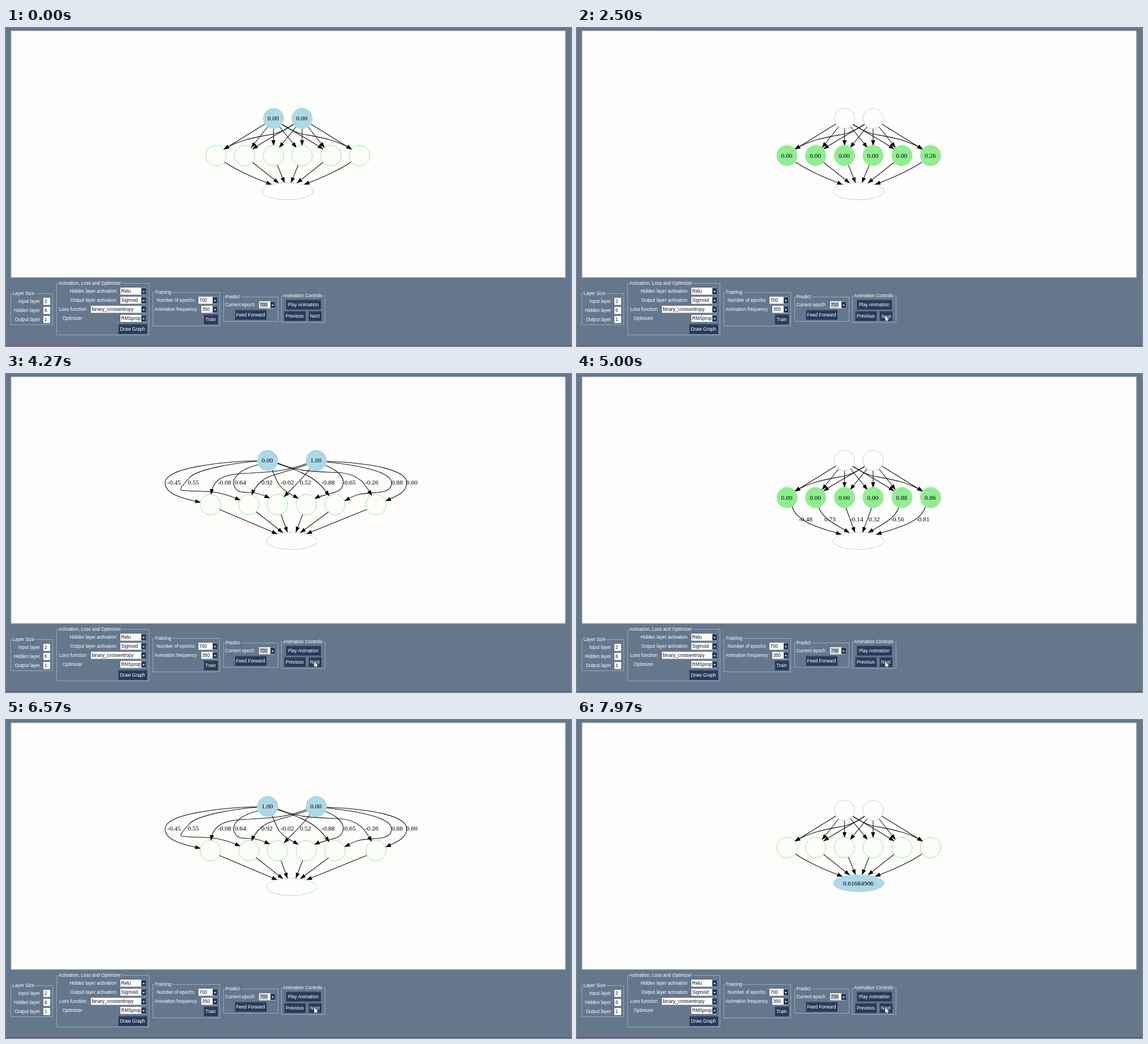
Recreate the animation shown at these times as an HTML page. Size 998 by 561 pixels, loop 8 s.

```html
<!DOCTYPE html>
<html lang="en">
<head>
<meta charset="utf-8">
<title>Neural network feed forward</title>
<style>
  html, body { margin: 0; width: 100%; height: 100%; overflow: hidden; background: #64778d; }
  svg { display: block; }
  .ui { font: 8.2px "Liberation Sans", Arial, sans-serif; fill: #fff; }
  .ui .field { fill: #111; }
  .legend { stroke: #64778d; stroke-width: 4px; paint-order: stroke; }
  .graph { font: 11.4px "Liberation Serif", "Times New Roman", serif; }
  .edge { fill: none; stroke: #111; stroke-width: 1.1px; marker-end: url(#arrow); }
</style>
</head>
<body>
<svg width="998" height="561" viewBox="0 0 998 561">
  <defs>
    <marker id="arrow" markerUnits="userSpaceOnUse" markerWidth="10" markerHeight="8" refX="9.5" refY="4" orient="auto">
      <path d="M0 .4L10 4L0 7.6z" fill="#000"/>
    </marker>
  </defs>
  <rect width="998" height="561" fill="#64778d"/>
  <rect x="9" y="5" width="979" height="435" fill="#fdfdfc" stroke="#b4bbc0"/>
  <rect y="560" width="998" height="1" fill="#46506a"/>
  <rect id="progress" y="560" width="138" height="1" fill="#d82c36"/>
  <g id="graph" class="graph"></g>
  <g id="panel" class="ui"></g>
  <path id="cursor" d="M0 0V11.5L2.7 9.1L4.5 13L6.3 12.2L4.6 8.4H8.3z" fill="#fff" stroke="#222" stroke-width=".7"/>
</svg>
<script>
const LOOP = 8000;
const $ = id => document.getElementById(id);

// ---- Control panel ----
const text = (s, x, y, anchor = 'start', cls = '') =>
  `<text x="${x}" y="${y + 3}" text-anchor="${anchor}" class="${cls}">${s}</text>`;
const box = (x, y, w, h, fill, stroke = 'none') =>
  `<rect x="${x}" y="${y}" width="${w}" height="${h}" fill="${fill}" stroke="${stroke}"/>`;
const frame = (title, x, y, right, bottom) =>
  box(x + .5, y + .5, right - x, bottom - y, 'none', '#9caab8') + text(title, x + 3.5, y, 'start', 'legend');
const entry = (value, x, y) =>
  box(x, y - 6, 12, 12.5, '#fff') + text(value, x + 2, y, 'start', 'field');
const combo = (value, x, right, y, selected) =>
  box(x, y - 6, right - x, 12.5, '#fff') +
  (selected ? box(x + 1, y - 5, 14.5, 10.5, '#c3ccd6') : '') +
  text(value, x + 1.5, y, 'start', 'field') +
  box(right - 8, y - 5.5, 8, 11.5, '#283b5b') +
  `<path d="M${right - 6} ${y}h4l-2 2.5z" fill="#fff"/>`;
const button = (label, x, y, w, id = '') =>
  `<g id="${id}">` + box(x + .5, y - 8, w, 16, '#283b5b', '#1c2c47') +
  `<path d="M${x + .5} ${y + 8}v-16h${w}" fill="none" stroke="#4d617f"/>` +
  `<g class="label">${text(label, x + w / 2 + .5, y, 'middle')}</g></g>`;

$('panel').innerHTML = [
  frame('Layer Size', 8, 468, 82, 523),
  ...[['Input', 2], ['Hidden', 6], ['Output', 1]].map(([name, size], i) =>
    text(name + ' layer', 60, 482 + 16 * i, 'end') + entry(size, 66, 482 + 16 * i)),

  frame('Activation, Loss and Optimizer', 89, 450, 252, 541),
  text('Hidden layer activation', 195, 464, 'end'), combo('Relu', 202, 247, 464),
  text('Output layer activation', 195, 480, 'end'), combo('Sigmoid', 202, 247, 480),
  text('Loss function', 94, 496), combo('binary_crossentropy', 150, 247, 496),
  text('Optimizer', 100, 512), combo('RMSprop', 202, 247, 512),
  button('Draw Graph', 198, 531, 50),

  frame('Training', 259, 466, 377, 525),
  text('Number of epochs', 333, 480, 'end'), combo('700', 340, 373, 480),
  text('Animation frequency', 337, 496, 'end'), combo('350', 345, 373, 496),
  button('Train', 349, 514, 24),

  frame('Predict', 384, 474, 480, 517),
  text('Current epoch', 439, 488, 'end'), combo('700', 447, 475, 488, true),
  button('Feed Forward', 404, 506, 55),

  frame('Animation Controls', 486, 472, 563, 519),
  button('Play Animation', 494, 488, 61),
  button('Previous', 491, 508, 37),
  button('Next', 534, 508, 22, 'next'),
].join('');

// ---- Graph layouts ----
const edge = d => `<path class="edge" d="${d}"/>`;
const mirrored = (paths, sum) => {
  const half = paths.map(edge).join('');
  return half + `<g transform="translate(${sum}) scale(-1 1)">${half}</g>`;
};
const weight = (value, x, y) => `<text x="${x}" y="${y}">${value}</text>`;

const inputEdges = [
  'M457 169.5L385 214', 'M462 174.5L433 211', 'M472.5 177.5V207.5', 'M483 174L513 211',
  'M487 170C510 184 535 197 560 213.5', 'M488 170C501 178 510 184 523 187C555 193 580 196 611 214',
];
const evenHidden = [371, 421.5, 472.5, 523, 574, 624.5];

const plain = {
  inputs: [472.5, 523], inputY: 159.5, hidden: evenHidden, hiddenY: 225, output: [497.5, 288],
  edges: mirrored([...inputEdges,
    'M386 236.5C408 251 436 264 469 276', 'M435.5 237L481.5 273.5', 'M479.5 242L492 273'], 995.5),
};

const inputWeights = {
  inputs: [462, 548], inputY: 152.5, hidden: [361, 429, 479.5, 530.5, 581, 653.5], hiddenY: 230.5,
  output: [504.5, 294.5],
  edges: [
    'M444 153C380 155 281 165 281 192C281 214 320 221 343.5 226.5',
    'M444 154C400 157 340 168 325 182C312 196 306 203 310 205C330 208 365 205 380 211C395 214 403 218 414 222.5',
    'M531 158C490 173 470 172 430 175C375 176 366 190 362 212.5',
    'M446 160C405 170 397 190 404 199C410 212 420 207 440 210C452 212 457 215 466 219',
    'M532 160C490 175 465 177 450 190C442 198 437 205 434 213.5',
    'M470 169C476 182 478 190 483 196C492 208 505 213 516.5 219.5',
    'M537 167C525 183 512 195 491 217',
    'M479 158C515 170 535 178 550 191C558 198 564 205 571 215',
    'M564 161C592 172 602 188 592 202C586 211 560 212 545 220',
    'M480 157C520 175 560 172 590 174C625 177 635 195 646 214.5',
    'M566 155C640 163 690 176 680 198C675 212 645 208 625 212C612 215 608 219 598 223.5',
    'M566 154C650 157 708 170 708 192C708 208 690 216 670.5 224',
    'M377 239L479 282', 'M442 243L489 280', 'M486 248L497 279',
    'M524 248L512 279', 'M570 243L520 280', 'M637 239L531 282',
  ].map(edge).join('') + [
    ['-0.45', 285], ['0.55', 321], ['-0.08', 374], ['0.64', 404], ['0.92', 451], ['-0.02', 485],
    ['0.52', 519], ['-0.88', 557], ['-0.65', 594], ['-0.26', 634], ['0.88', 681], ['0.60', 707],
  ].map(([value, x]) => weight(value, x, 195)).join(''),
};

const outputWeights = {
  inputs: [472.5, 523], inputY: 152.5, hidden: evenHidden, hiddenY: 218, output: [497.5, 294.5],
  edges: `<g transform="translate(0 -7)">${mirrored(inputEdges, 995.5)}</g>` +
    mirrored(['M380 234C388 262 430 272 467 283', 'M427 235C434 256 458 266 481 280', 'M475 236L491 279.5'], 995.5) +
    [['-0.48', 392], ['0.73', 437], ['-0.14', 482], ['0.32', 515], ['-0.56', 554], ['-0.81', 599]]
      .map(([value, x]) => weight(value, x, 260)).join(''),
};

const node = (x, y, rx, ry, color, value) =>
  `<ellipse cx="${x}" cy="${y}" rx="${rx}" ry="${ry}" stroke="${color}" fill="${value ? color : 'none'}"/>` +
  (value ? `<text x="${x - .5}" y="${y + 3.5}" text-anchor="middle">${value}</text>` : '');

function drawGraph(layout, active, sample) {
  const values = layer => layer === active ? sample[layer] : [];
  const [ox, oy] = layout.output;
  return layout.edges +
    layout.inputs.map((x, i) => node(x, layout.inputY, 18, 18, '#add8e6', values('input')[i])).join('') +
    layout.hidden.map((x, i) => node(x, layout.hiddenY, 18, 18, '#90ee90', values('hidden')[i])).join('') +
    node(ox, oy, 45, 15, '#add8e6', values('output')[0]);
}

// ---- Timeline: five stages per sample ----
const samples = [
  ['0.00 0.00', '0.00 0.00 0.00 0.00 0.00 0.26', '0.38274516'],
  ['0.00 1.00', '0.00 0.00 0.00 0.00 0.88 0.86', '0.61921364'],
  ['1.00 0.00', '0.00 0.65 0.00 0.00 0.00 0.00', '0.61684906'],
].map(rows => {
  const [input, hidden, output] = rows.map(row => row.split(' '));
  return { input, hidden, output };
});
const stages = [
  [plain, 'input'], [inputWeights, 'input'], [plain, 'hidden'], [outputWeights, 'hidden'], [plain, 'output'],
];
const starts = [
  0, 1300, 1980, 2550, 3020,
  3480, 3920, 4450, 4960, 5400,
  5780, 6280, 6930, 7540, 7930,
];

const nextLabel = document.querySelector('#next .label');
let shown = -1;

function render(t) {
  const step = starts.findLastIndex(start => t >= start);
  if (step !== shown) {
    shown = step;
    $('graph').innerHTML = drawGraph(...stages[step % 5], samples[Math.floor(step / 5)]);
  }
  const pressed = starts.some(start => start > t && start - t <= 100);
  nextLabel.setAttribute('transform', pressed ? 'translate(1 1)' : '');

  const p = Math.min(1, Math.max(0, (t - 450) / 500));
  const away = (1 - p) ** 3;
  $('cursor').setAttribute('transform', `translate(${544 + 76 * away} ${506.5 + 54 * away})`);
  $('cursor').setAttribute('visibility', p > 0 ? 'visible' : 'hidden');
  $('progress').setAttribute('opacity', Math.min(1, Math.max(.12, (1000 - t) / 300)));
}

function tick() {
  render(performance.now() % LOOP);
  requestAnimationFrame(tick);
}
tick();
</script>
</body>
</html>
```
